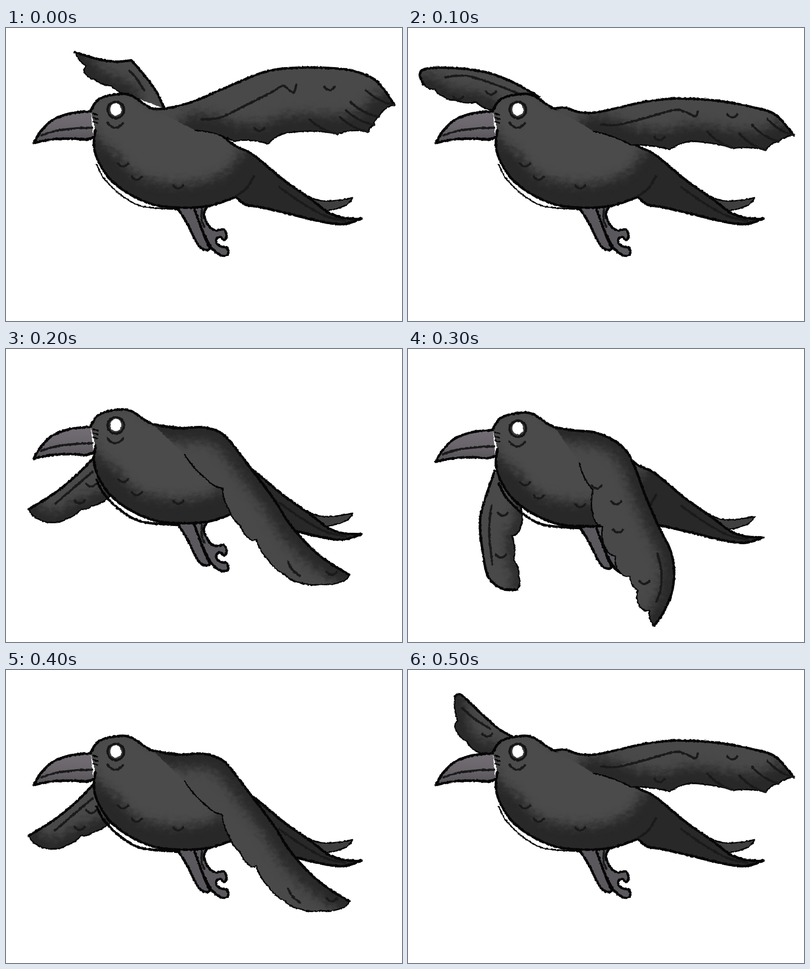
An HTML page for the animation above (0.55 s loop, 869 by 644 pixels).

```html
<!DOCTYPE html>
<html lang="en">
<head>
<meta charset="utf-8">
<title>Flying crow</title>
<style>
  html, body { margin: 0; width: 100%; height: 100%; overflow: hidden; background: #fff; }
  svg { display: block; width: 869px; height: 644px; }
  .ink, .thin, .mark, .dusk { fill: none; stroke: #060606; stroke-linecap: round; stroke-linejoin: round; }
  .ink { stroke-width: 5.5; }
  .thin { stroke-width: 3; }
  .mark { stroke: #1a1a1a; stroke-width: 5; }
  .dusk { stroke: #282828; filter: url(#brush); }
</style>
</head>
<body>
<svg viewBox="0 0 869 644">
  <defs>
    <filter id="rough" filterUnits="userSpaceOnUse" x="0" y="0" width="869" height="644" color-interpolation-filters="sRGB">
      <feTurbulence type="fractalNoise" baseFrequency=".2" numOctaves="2" seed="4"/>
      <feDisplacementMap in="SourceGraphic" scale="4" xChannelSelector="R" yChannelSelector="G"/>
    </filter>
    <filter id="brush" filterUnits="userSpaceOnUse" x="0" y="0" width="869" height="660" color-interpolation-filters="sRGB">
      <feGaussianBlur in="SourceGraphic" stdDeviation="12" result="soft"/>
      <feTurbulence type="fractalNoise" baseFrequency=".07 .12" numOctaves="3" seed="9"/>
      <feDisplacementMap in="soft" scale="22" xChannelSelector="R" yChannelSelector="G"/>
    </filter>
    <linearGradient id="horn" x1="0" y1="0" x2="0" y2="1">
      <stop offset="0" stop-color="#736e75"/>
      <stop offset=".5" stop-color="#69656b"/>
      <stop offset="1" stop-color="#535055"/>
    </linearGradient>
  </defs>
  <g id="bird" filter="url(#rough)"></g>
</svg>
<script>
const STEP = 100, LOOP = 550, ALL = '012345';
const LIFT = [0, 0, -12, -5, 0, 0];

// "x,y" pairs; "!" marks a sharp corner.
const points = text => text.split(' ').map(s => {
  const [x, y] = s.replace('!', '').split(',').map(Number);
  return { x, y, sharp: s.endsWith('!') };
});

// Smooth line through the points.
function curve(text) {
  const p = points(text);
  const at = i => p[Math.max(0, Math.min(p.length - 1, i))];
  const handle = (i, dir) => {
    const k = at(i).sharp ? 0 : dir / 6;
    return `${at(i).x + (at(i + 1).x - at(i - 1).x) * k},${at(i).y + (at(i + 1).y - at(i - 1).y) * k}`;
  };
  return `M${p[0].x},${p[0].y}` + p.slice(1).map((q, i) =>
    `C${handle(i, 1)} ${handle(i + 1, -1)} ${q.x},${q.y}`).join('');
}

// Feathered edge: one arc between each two points.
function scallops(text, bulge) {
  const p = points(text);
  return p.slice(1).map((q, i) => {
    const dx = q.x - p[i].x, dy = q.y - p[i].y, len = Math.hypot(dx, dy);
    const k = Math.sign(bulge) * Math.min(Math.abs(bulge), len * .3) / len;
    return `Q${(p[i].x + q.x) / 2 + dy * k},${(p[i].y + q.y) / 2 - dx * k} ${q.x},${q.y}`;
  }).join('');
}

const line = (d, kind = 'mark') => `<path class="${kind}" d="${d}"/>`;
const cups = (text, w = 22) => points(text).map(({ x, y }) =>
  line(`M${x - w / 2},${y}q${w / 2},${w * .6} ${w},0`)).join('');
const group = (on, ride, content) =>
  `<g data-on="${on}"${ride ? ' data-ride' : ''}>${content}</g>`;
const solid = (d, fill, kind = 'ink') => `<path d="${d}" fill="${fill}"/>` + line(d, kind);

let clips = 0;
function clipped(d, content) {
  const id = 'clip' + clips++;
  return `<clipPath id="${id}"><path d="${d}"/></clipPath><g clip-path="url(#${id})">${content}</g>`;
}

// A wing runs along its leading edge to the tip and back along the feathers.
function wing({ on, ride, lead, trail, bulge, bone, marks = '', plumes = 0, reach = [0, 0], dusk = 'trail', depth = 50 }) {
  const front = curve(lead), tip = points(trail)[0];
  const back = scallops(trail, bulge), d = front + back;
  const rear = `M${tip.x},${tip.y}${back}`;
  const [rx, ry] = reach;
  const quills = points(trail).slice(0, plumes).map(({ x, y }) =>
    line(`M${x},${y}q${rx * .55},${ry * .2} ${rx},${ry}`)).join('');
  const shade = `<path class="dusk" stroke-width="${depth}" d="${dusk === 'lead' ? front : rear}"/>`;
  return group(on, ride, `<path d="${d}" fill="#494949"/>` + clipped(d, shade) +
    line(front, 'ink') + line(rear, 'thin') +
    quills + line(curve(bone)) + (marks && cups(marks)));
}

const farWings = [
  wing({
    on: '0', bulge: -6, bone: '271,94 285,109 303,137',
    lead: '347,177 330,140 302,102 275,71! 240,74 200,68 151,53',
    trail: '151,53 176,84 172,98 196,114 230,127 270,148'
  }),
  wing({
    on: '1', bulge: -7, bone: '82,108 128,105 185,122 245,145', marks: '182,140 110,151',
    lead: '287,151 230,119 170,97 100,88 42,89 26,102 34,124',
    trail: '34,124 60,135 78,150 102,158 150,163 185,180'
  }),
  wing({
    on: '24', ride: 1, bulge: -6, bone: '190,282 150,316 108,352', marks: '187,308 162,345',
    lead: '197,246 155,289 105,330 50,364',
    trail: '50,364 68,384 100,393 131,386 165,364 187,358 230,335'
  }),
  wing({
    on: '3', bulge: -8, bone: '183,345 178,400 185,473', marks: '208,360 204,452', depth: 30,
    lead: '190,268 163,350 158,390 163,440 172,490 186,513 210,528 240,529',
    trail: '240,529 243,500 232,464 228,411 246,395 248,349'
  }),
  wing({
    on: '5', bulge: -7, bone: '119,84 147,108 180,129', marks: '174,140',
    lead: '232,148 200,130 160,95 117,55 103,58',
    trail: '103,58 109,112 103,128 130,158 155,181 185,183'
  })
];

const nearWings = [
  wing({
    on: '0', bulge: -10, plumes: 5, reach: [-62, -32], depth: 75,
    bone: '430,201 470,197 520,173 585,140 608,127 630,142 637,125', marks: '710,130 556,220',
    lead: '322,177 350,177 410,162 480,132 570,96 650,87 745,91 800,108 827,132 852,169',
    trail: '852,169 818,195 808,213 795,228 728,233 620,230 575,255 500,249 415,225'
  }),
  wing({
    on: '15', bulge: -6, plumes: 4, reach: [-58, -36], depth: 75,
    bone: '424,212 460,213 520,198 580,181 605,183 630,194 636,183', marks: '712,190 552,240',
    lead: '322,177 345,175 375,185 410,186 450,178 520,162 590,155 680,160 760,175 807,191 847,236',
    trail: '847,236 813,249 785,268 715,264 620,249 575,267 490,257 408,227'
  }),
  wing({
    on: '24', ride: 1, bulge: 7, dusk: 'lead', depth: 60,
    bone: '619,480 628,497 645,511', marks: '715,502',
    lead: '322,177 375,186 430,184 465,193 490,213 540,278 590,345 622,396 670,450 710,482 753,508',
    trail: '753,508 740,522 692,529 645,525 612,508 575,475 549,430 538,432 514,400 490,366 475,318 442,300 392,244'
  }),
  wing({
    on: '3', bulge: 9, dusk: 'lead', depth: 55,
    bone: '548,450 556,490 554,530 545,555', marks: '414,300 457,335 461,397 519,510',
    lead: '322,172 365,179 408,183 450,200 480,225 500,265 520,320 550,390 576,443 584,490 578,538 560,580 540,608',
    trail: '540,608 530,575 510,568 504,530 487,500 463,488 456,455 434,439 427,390 408,372 406,310 376,250'
  })
];

const farLeg = curve('376,396 395,425 420,474 435,487 447,484 437,462 412,394');
const nearLeg = curve('412,394 426,432 440,465 455,488 474,500 487,497 485,483 474,481 463,474 462,464 470,459 479,466 484,457 478,443 460,445 446,436 434,411 441,393');
const legs = group(ALL, 1, solid(farLeg, '#5b585d') + solid(nearLeg, '#5b585d') +
  line(curve('430,398 429,420 435,437')));

const tail = group(ALL, 1, solid(curve('640,357 680,377 715,380 761,373! 745,390 700,402 660,395'), '#3f3f3f', 'thin'));

const torso = curve('186,181 203,157 240,146 274,148 321,177 380,186 430,202 500,257 540,277 604,330 640,356 675,381 708,406 740,417 780,419! 740,431 690,425 620,408 560,394 525,388 505,371! 470,384 440,392 400,395 335,391 280,370 233,337 204,296 193,260 196,225');
const glow = curve('170,190 200,135 280,130 325,165 440,180 520,245 500,295 465,325 400,342 335,338 280,320 248,282 205,245 170,190');
const body = group(ALL, 1, `<path d="${torso}" fill="#282828"/>` +
  clipped(torso, `<path d="${glow}" fill="#4b4b4b" filter="url(#brush)"/>`) + line(torso, 'ink') +
  line(curve('505,369 528,352 544,326')) + line(curve('600,350 650,385 700,413 745,424')) +
  cups('257,298 287,327 378,346'));

const breast = curve('199,300 216,332 255,369 300,392 380,399');
const belly = group('015', 1, line(breast, 'thin')) + group('234', 1, line(breast, 'ink'));

const beak = curve('186,183 140,188 101,203 75,229 61,253! 100,245 145,243 175,245 192,240');
const face = group(ALL, 1, solid(beak, 'url(#horn)') +
  line(curve('77,236 110,226 150,221 189,219')) + cups('240,209', 34) +
  [0, 1, 2].map(i => line(`M191,${188 + i * 9}l10,3`, 'thin')).join('') +
  `<circle cx="241" cy="180" r="18" fill="#3c3c3c" stroke="#141414" stroke-width="5"/>
   <ellipse cx="241" cy="179" rx="12" ry="13.5" fill="#fff"/>`);

const bird = document.getElementById('bird');
bird.innerHTML = [legs, ...farWings, tail, body, belly, face, ...nearWings].join('');
const groups = [...bird.querySelectorAll('[data-on]')];

let shown = -1;
function draw(now) {
  const pose = Math.min(5, Math.floor((now % LOOP) / STEP));
  if (pose === shown) return;
  shown = pose;
  for (const g of groups) {
    g.style.display = g.dataset.on.includes(pose) ? '' : 'none';
    if ('ride' in g.dataset) g.setAttribute('transform', `translate(0 ${LIFT[pose]})`);
  }
}

const start = performance.now();
function tick() {
  draw(performance.now() - start);
  requestAnimationFrame(tick);
}
tick();
</script>
</body>
</html>
```
